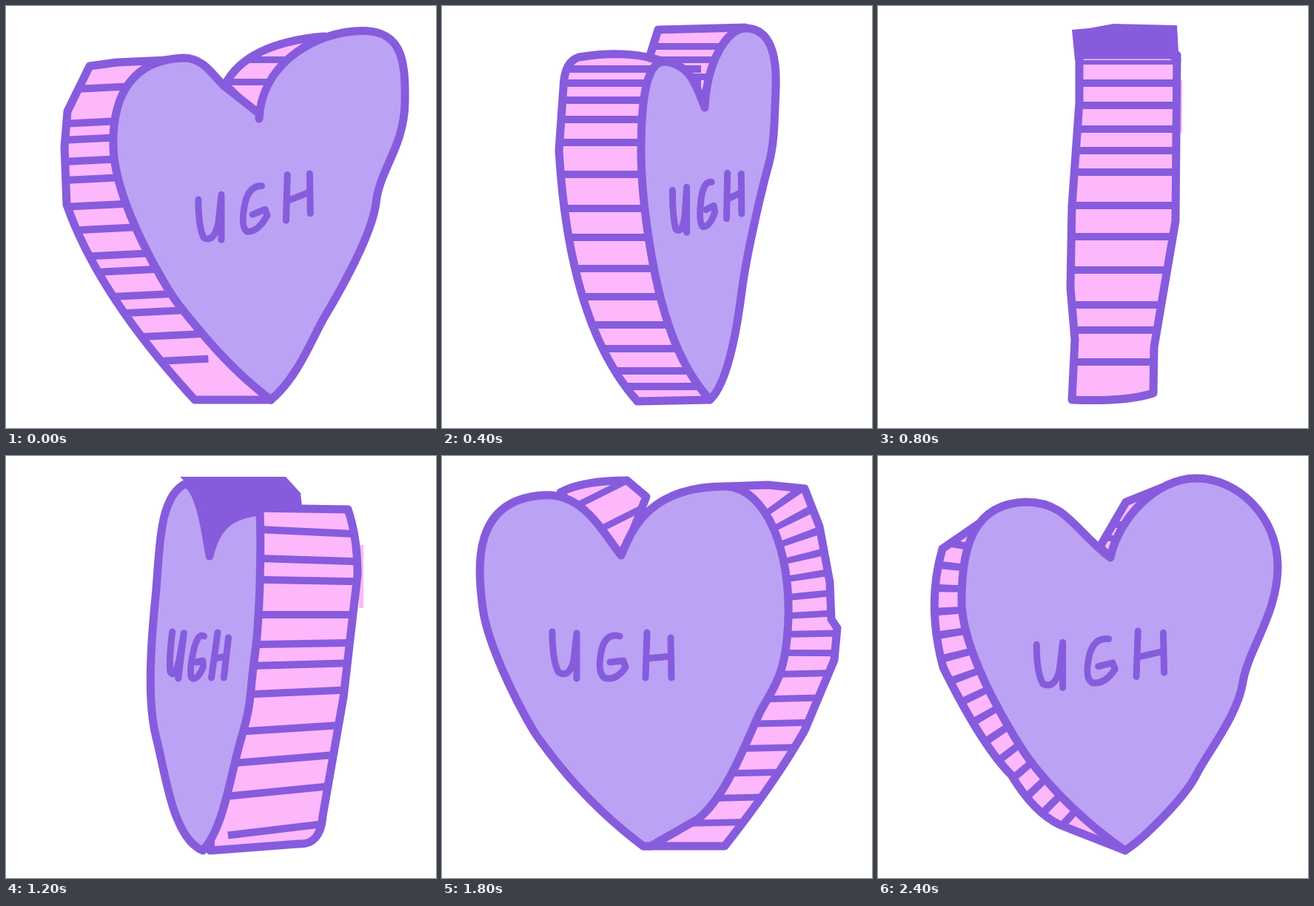
Animation, 581 px wide and 569 px high, one loop 2.6 s. Source, as an HTML page without scripts:

```html
<!DOCTYPE html>
<html lang="en">
<head>
<meta charset="utf-8">
<title>Turning candy heart</title>
<style>
  html, body { margin: 0; height: 100%; overflow: hidden; background: #fff; }
  svg { display: block; width: 100%; height: 100%; }
  path { fill: none; stroke: #865cdd; stroke-width: 11; stroke-linejoin: round; }
  .side, .face, .word { stroke-linecap: round; vector-effect: non-scaling-stroke; }
  .side { fill: #fdb8fc; }
  .face { fill: #bca2f5; }
  .solid { fill: #865cdd; stroke: none; }
  .spill { stroke: #fdb8fc; stroke-width: 6; }
  .bars { stroke-width: 240; }
  .slim { stroke-width: 100; stroke-dasharray: 9 17; }
  .word { stroke-width: 9; }
  .pose { visibility: hidden; animation: pose 2.6s step-end infinite; animation-delay: calc(var(--i) * .2s - 2.6s); }
  @keyframes pose {
    0% { visibility: visible; }
    7.6923%, 100% { visibility: hidden; }
  }
</style>
</head>
<body>
<svg viewBox="0 0 581 569" role="img" aria-label="UGH">
<defs>
  <path id="word" class="word" d="M-82-33Q-82 5-74 21Q-59 31-53 5L-49-31V30M9-27Q-9-32-15-10Q-22 20-12 29Q4 34 17 15L14 6-4 8M46-32 44 29M46 3 78 0M78-25 79 29"/>

  <!-- side walls: stripes are broad dashes clipped to the wall -->
  <clipPath id="clip-a"><use href="#wall-a"/></clipPath>
  <clipPath id="clip-b"><use href="#wall-b"/></clipPath>
  <clipPath id="clip-c"><use href="#wall-c"/></clipPath>
  <clipPath id="clip-d"><use href="#wall-d"/></clipPath>
  <clipPath id="clip-e"><use href="#wall-e"/></clipPath>
  <clipPath id="clip-f"><use href="#wall-f"/></clipPath>
  <clipPath id="clip-g"><use href="#wall-g"/></clipPath>

  <g id="side-a">
    <path id="wall-a" class="side" d="M240 72 150 76 113 81 83 142 79 190 82 268Q125 390 255 531H358L300 300ZM296 106Q325 50 430 41L400 150H342Z"/>
    <g clip-path="url(#clip-a)">
      <path class="bars" stroke-dasharray="10 36 10 12 10 19 10 15 10 26 10 22 10 26 10 12 10 24 10 13 10 23 10 24 10 60" d="M135 105 155 512"/>
      <path class="bars" d="M390 68v9M390 98v9"/>
    </g>
  </g>
  <g id="side-b">
    <path id="wall-b" class="side" d="M300 75Q250 58 185 69 165 75 164 110L158 195Q172 430 264 533L362 531 330 200ZM280 70 292 32 410 29 400 137H355L300 75Z"/>
    <g clip-path="url(#clip-b)">
      <path class="bars" stroke-dasharray="10 9 10 13 10 16 10 21 10 33 10 36 10 29 10 32 10 28 10 28 10 22 10 20 10 11 10 90" d="M230 80V530"/>
      <path class="bars" d="M405 50v9M405 68v9M405 91v9"/>
    </g>
  </g>
  <g id="side-c">
    <path class="spill" d="M408 100V171"/>
    <path id="wall-c" class="side" d="M272 66V130L262 270 260 380 266 450 262 531Q335 534 372 522L373 460 402 290 404 66Z"/>
    <path class="solid" d="M262 32 285 30 318 24 404 26 406 62 410 73 397 74 390 61 340 65 279 62 277 73 266 73Z"/>
    <path class="bars" clip-path="url(#clip-c)" stroke-dasharray="6 20 10 20 10 22 10 19 10 19 10 35 10 32 10 35 10 37 10 24 10 33 10 90" d="M335 73V530"/>
  </g>
  <g id="side-d">
    <path class="spill" d="M480 120V205"/>
    <path id="wall-d" class="side" d="M330 70 462 72Q475 110 475 160L456 325 428 485Q425 525 395 523L276 532 290 200Z"/>
    <path class="bars" clip-path="url(#clip-d)" stroke-dasharray="10 28 10 18 10 36 10 29 10 18 10 27 10 38 10 30 10 32 10 40 10 90" d="M405 97Q395 300 420 505"/>
    <path class="solid" d="M235 28H378L398 50 400 68 343 76 293 95 280 138H270L256 48Z"/>
  </g>
  <g id="side-e">
    <path id="wall-e" class="side" d="M300 66 355 58 440 61Q485 70 493 110L497 200Q495 390 392 533H274L330 200ZM225 36 346 33 362 55 300 66 262 122Z"/>
    <g clip-path="url(#clip-e)">
      <path class="bars" stroke-dasharray="10 26 10 32 10 28 10 32 10 24 10 24 10 30 10 25 10 32 10 40 10 25 10 90" d="M425 76 465 510"/>
      <path class="bars" d="M282 33l3 9M310 44l4 9"/>
    </g>
    <path class="solid" d="M228 38 270 66 302 62 268 126H257Z"/>
  </g>
  <g id="side-f">
    <path id="wall-f" class="side" d="M385 41 440 39 490 44 510 95 524 170 526 220 534 232 530 275 490 370Q450 440 382 526H272L400 200ZM160 49Q190 33 250 33L276 55 245 134 185 80Z"/>
    <g clip-path="url(#clip-f)">
      <path class="slim" d="M452 62C480 100 498 150 497 270"/>
      <path class="bars" stroke-dasharray="9 24" d="M450 290 455 500"/>
      <path class="bars" d="M212 47l4 8M245 78l4 8"/>
    </g>
  </g>
  <g id="side-g">
    <path id="wall-g" class="side" d="M135 92 87 125Q65 200 88 285 140 390 180 430 210 480 245 497L334 532 200 300ZM300 122 335 62 385 42 350 138H314Z"/>
    <g clip-path="url(#clip-g)">
      <path class="slim" style="stroke-dasharray:10 20;stroke-width:64" d="M106 114Q85 225 125 315T262 492"/>
      <path class="slim" d="M318 88v9M318 107v8"/>
    </g>
  </g>

  <!-- front faces -->
  <path id="face-a" class="face" d="M358 531C300 488 255 430 235 405S147 265 145 190 175 72 240 70C268 70 280 95 296 109L342 145V152C345 85 405 40 470 34S540 70 539 130 505 220 500 265 445 395 430 420 395 500 358 531Z"/>
  <path id="face-b" class="face" d="M362 531C325 490 308 440 297 400S269 270 269 195 278 75 300 75C335 77 345 110 355 137 358 75 385 30 410 30S453 50 451 110 448 190 441 215 412 330 405 385 385 510 362 531Z"/>
  <path id="face-d" class="face" d="M266 532C225 515 216 430 203 380S196 250 202 190 205 55 243 37C260 45 268 90 275 135 285 90 310 78 343 75 345 130 343 220 336 270S333 330 318 380 295 500 266 532Z"/>
  <path id="face-e" class="face" d="M272 533C225 490 190 430 170 365S133 220 133 165 130 45 215 36C245 38 250 80 262 122 275 85 310 66 340 68 375 75 390 130 390 230 390 290 382 330 377 350S310 500 285 530Z"/>
  <path id="face-f" class="face" d="M272 526C190 465 145 400 130 380S62 260 55 205 40 60 135 53C190 48 215 100 242 134 255 105 275 40 385 41 440 45 470 130 468 215S445 315 430 345 385 460 345 490L282 526Z"/>
  <path id="face-g" class="face" d="M334 532C265 485 220 430 205 410S113 270 113 195 130 64 200 62C255 62 265 100 314 137 325 85 375 30 430 30S538 80 540 145 500 260 493 305 445 400 430 430 360 515 334 532Z"/>
</defs>

<g class="pose" style="--i:0">
  <use href="#side-a"/><use href="#face-a"/>
  <use href="#word" transform="translate(337 272)skewY(-16)scale(.94 1)"/>
</g>
<g class="pose" style="--i:1">
  <use href="#side-a" transform="translate(42)scale(.888 1)"/>
  <use href="#face-a" transform="translate(104)scale(.718 1)"/>
  <use href="#word" transform="translate(349 270)skewY(-16)scale(.75 1)"/>
</g>
<g class="pose" style="--i:2">
  <use href="#side-b"/><use href="#face-b"/>
  <use href="#word" transform="translate(359 266)skewY(-18)scale(.58 1)"/>
</g>
<g class="pose" style="--i:3">
  <use href="#side-b" transform="translate(68)scale(.82 1)"/>
  <use href="#face-b" transform="translate(128)scale(.64 1)"/>
  <use href="#word" transform="translate(369 263)skewY(-15)scale(.36 1)"/>
</g>
<g class="pose" style="--i:4">
  <use href="#side-c"/>
</g>
<g class="pose" style="--i:5">
  <use href="#side-d" transform="translate(45)scale(.82 1)"/>
  <use href="#face-d" transform="translate(119)scale(.53 1)"/>
  <use href="#word" transform="translate(262 270)scale(.33 1)"/>
</g>
<g class="pose" style="--i:6">
  <use href="#side-d"/><use href="#face-d"/>
  <use href="#word" transform="translate(260 270)skewX(-7)scale(.48 1)"/>
</g>
<g class="pose" style="--i:7">
  <use href="#side-e"/><use href="#face-e"/>
  <use href="#word" transform="translate(250 273)skewY(5)scale(.78 1.1)"/>
</g>
<g class="pose" style="--i:8">
  <use href="#side-f" transform="translate(19)scale(.93 1)"/>
  <use href="#face-f" transform="translate(46)scale(.815 1)"/>
  <use href="#word" transform="translate(240 272)skewY(2)scale(.88 1)"/>
</g>
<g class="pose" style="--i:9">
  <use href="#side-f"/><use href="#face-f"/>
  <use href="#word" transform="translate(231 270)"/>
</g>
<g class="pose" style="--i:10">
  <use href="#side-f" transform="translate(22)scale(.96 1)"/>
  <use href="#face-f" transform="translate(-4)scale(1.08 1)"/>
  <use href="#word" transform="translate(249 272)"/>
</g>
<g class="pose" style="--i:11">
  <use href="#face-g" transform="translate(-87)scale(1.17 1)"/>
  <use href="#word" transform="translate(276 273)skewY(-2)"/>
</g>
<g class="pose" style="--i:12">
  <use href="#side-g"/><use href="#face-g"/>
  <use href="#word" transform="translate(302 275)skewY(-8)scale(1.07 1)"/>
</g>
</svg>
</body>
</html>
```
